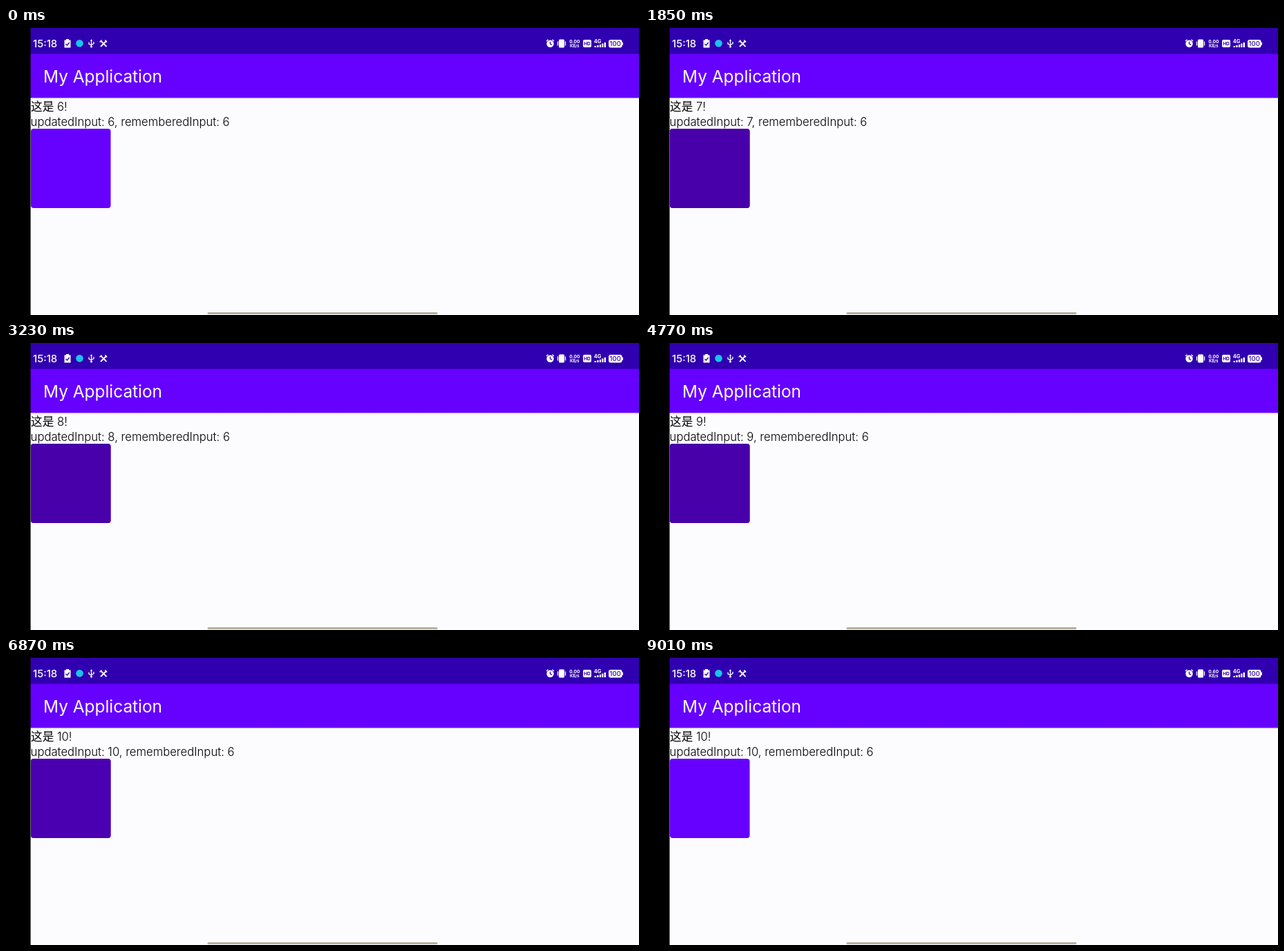
These frames come from a looping animation (916x416 px, 9.99 s). An HTML page:

```html
<!DOCTYPE html>
<html lang="zh">
<head>
<meta charset="utf-8">
<style>
  html, body { margin: 0; width: 100%; height: 100%; overflow: hidden; background: #fcfcff; }
  svg { display: block; width: 916px; height: 416px; }
  text { font-family: Inter, "Noto Sans CJK SC", "Noto Sans CJK", sans-serif; }
  .body { font-size: 16.65px; font-weight: 300; fill: #000; }
  .tiny { font-size: 6.6px; font-weight: 700; fill: #fff; text-anchor: middle; }
  .line { fill: none; stroke: #fff; stroke-width: 1.3; }
  .dark { stroke: #3000b0; }
</style>
</head>
<body>
<svg viewBox="0 0 916 416">
  <defs>
    <clipPath id="card"><rect x="36" y="146" width="115.5" height="115" rx="4"/></clipPath>
    <linearGradient id="shade" x2="0" y2="1">
      <stop offset="0" stop-color="#8c86a0" stop-opacity=".3"/>
      <stop offset="1" stop-color="#8c86a0" stop-opacity="0"/>
    </linearGradient>
  </defs>
  <rect width="916" height="416" fill="#fcfcff"/>
  <rect width="916" height="38" fill="#3000b0"/>
  <rect y="37.5" width="916" height="63.8" fill="#6600ff"/>
  <rect y="101.3" width="916" height="2" fill="url(#shade)"/>
  <rect width="35.6" height="416"/>

  <!-- status bar, left -->
  <text x="39" y="28" font-size="14.9" font-weight="500" fill="#fff">15:18</text>
  <path d="M84.5 17.5h2.5v-1.5h4v1.5h2.5v11h-9z" fill="#fff"/>
  <path d="M86.5 23l2 2 3.2-4" class="line dark"/>
  <circle cx="106.5" cy="22.3" r="5.3" fill="#18c4ee"/>
  <g class="line">
    <path d="M123.5 18v8M120 20.5v2.5l3.5 2M127 20v2.5l-3.5 2"/>
    <path d="M137 18.5l8.5 8.5M145.5 18.5l-8.5 8.5" stroke-width="1.8"/>
    <path d="M135.5 20.5l3-3M143.2 17.5l3 3"/>
  </g>
  <g fill="#fff">
    <path d="M121.8 18.8l1.7-2.6 1.7 2.6z"/>
    <circle cx="123.5" cy="27" r="1.5"/>
  </g>

  <!-- status bar, right -->
  <circle cx="787.5" cy="22.8" r="5.2" fill="#fff"/>
  <path d="M787.5 19.7v3.3l2.4 1.4" class="line dark"/>
  <path d="M782 19l2.6-2.2M793 19l-2.6-2.2" class="line"/>
  <rect x="800" y="16.5" width="8" height="12" rx="1.5" fill="#fff"/>
  <path d="M798.5 19.5v6M809.5 19.5v6" class="line"/>
  <text id="speed" class="tiny" x="822.8" y="22">0.00</text>
  <text class="tiny" x="822.8" y="28.2" style="font-size:5.8px">KB/s</text>
  <rect x="835" y="17" width="12" height="11" rx="2" fill="#fff"/>
  <text class="tiny" x="841" y="25" style="fill:#3000b0">HD</text>
  <text class="tiny" x="856" y="22.3" style="font-size:7.5px">4G</text>
  <path d="M851.5 28v-2h2.4v2zM855.2 28v-3h2.4v3zM858.9 28v-4h2.2v4zM862.2 28v-5.5h2.2v5.5zM865.6 28v-7h2.4v7z" fill="#fff"/>
  <rect x="872" y="17" width="19.5" height="11.5" rx="3" fill="#fff"/>
  <rect x="891" y="20.5" width="2" height="4.5" rx="1" fill="#fff"/>
  <text class="tiny" x="881.7" y="26.4" style="fill:#3000b0;font-size:9.5px;font-weight:500">100</text>

  <text x="54" y="79" font-size="24.4" font-weight="400" fill="#fff">My Application</text>
  <text class="body" id="title" x="36" y="119.5"></text>
  <text class="body" id="info" x="35.6" y="141.5"></text>

  <g clip-path="url(#card)">
    <rect x="36" y="146" width="116" height="116" fill="#6600ff"/>
    <rect id="fade" x="36" y="146" width="116" height="116" fill="#4800aa"/>
    <circle id="ripple" cx="105" cy="206" fill="#4800aa"/>
  </g>
  <rect x="291.5" y="412" width="333" height="3" rx="1.5" fill="#b7ae9c"/>
</svg>
<script>
  const LOOP = 9990, GROW = 290, HOLD = 980, FADE = 950, REACH = 94;
  const taps = [1150, 2930, 4470, 5812];
  const el = id => document.getElementById(id);
  const clamp = v => Math.max(0, Math.min(1, v));
  const put = (id, s) => { if (el(id).textContent !== s) el(id).textContent = s; };
  const level = age => age < GROW ? 0 : 1 - clamp((age - HOLD) / FADE);

  function draw(t) {
    const past = taps.filter(s => t >= s);
    const n = 6 + past.length;
    put('title', `这是 ${n}!`);
    put('info', `updatedInput: ${n}, rememberedInput: 6`);
    put('speed', t >= 9010 ? '0.60' : '0.00');

    const age = past.length ? t - past[past.length - 1] : LOOP;
    const growing = age < GROW;
    const shade = Math.max(0, ...past.map(s => level(t - s)));
    // once a new ripple covers the card, only its own fade remains
    el('fade').setAttribute('opacity', growing ? shade : level(age));
    el('ripple').setAttribute('r', growing ? REACH * age / GROW : 0);
  }

  const start = performance.now();
  function tick() {
    draw((performance.now() - start) % LOOP);
    requestAnimationFrame(tick);
  }
  draw(0);
  requestAnimationFrame(tick);
</script>
</body>
</html>
```
